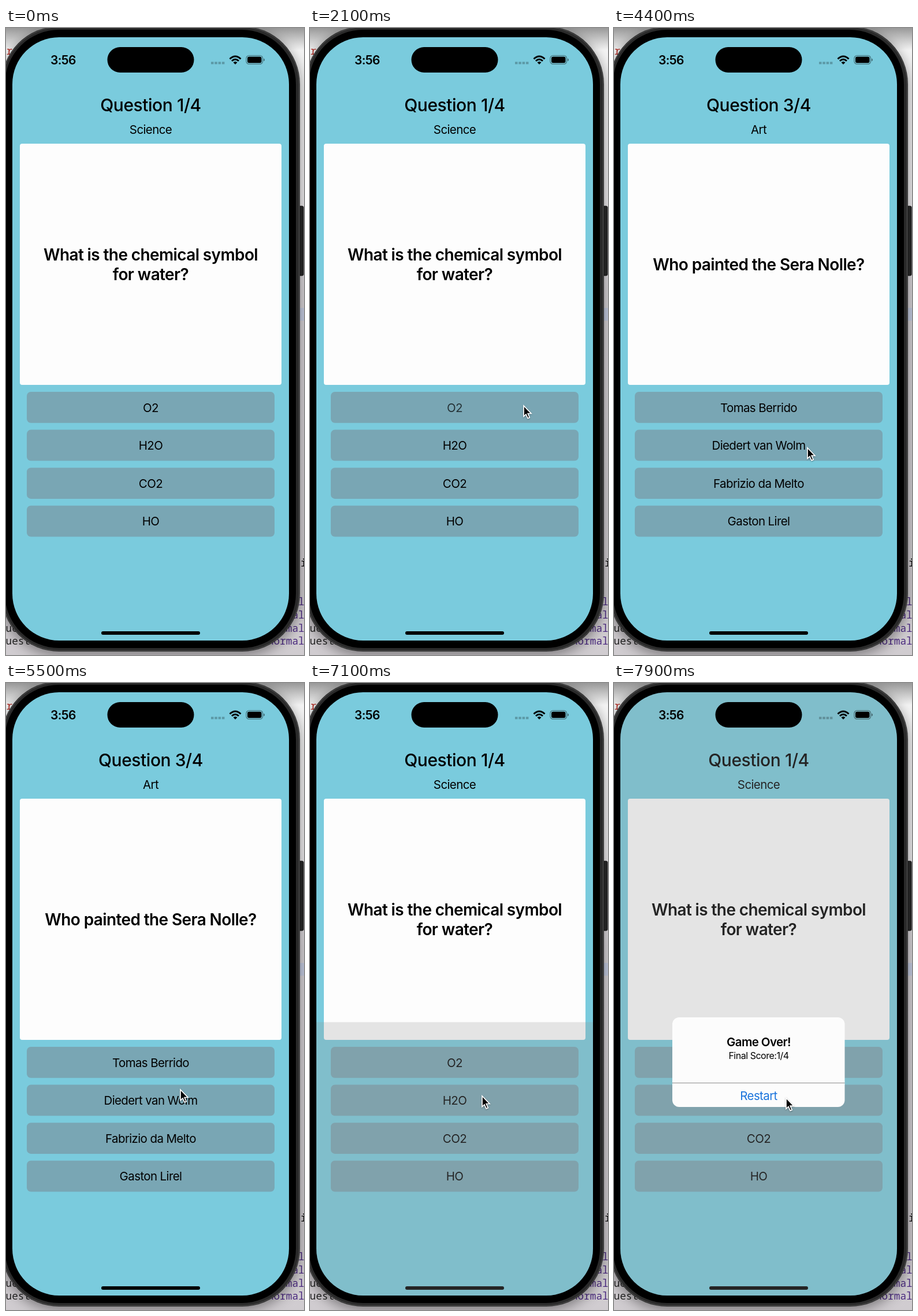
Animation, 516 px wide and 1084 px high, one loop 8000 ms. Source, as an HTML page:

```html
<!DOCTYPE html>
<html lang="en">
<head>
<meta charset="utf-8">
<title>Quiz</title>
<style>
  html, body { margin: 0; width: 100%; height: 100%; overflow: hidden; }
  svg { display: block; width: 516px; height: 1084px; }
  text { font: 20.5px Inter, Roboto, sans-serif; font-optical-sizing: none; letter-spacing: -.03em; text-anchor: middle; }
  #title { font-size: 30px; font-weight: 500; letter-spacing: -.015em; }
  #card text { font-size: 28px; font-weight: 600; letter-spacing: -.022em; }
  .bold { font-weight: 600; }
  .code text { font: 500 17.7px "Noto Sans Mono", "DejaVu Sans Mono", monospace; letter-spacing: 0; text-anchor: start; }
</style>
</head>
<body>
<svg viewBox="0 0 516 1084">
  <defs>
    <linearGradient id="desk" x2="0" y2="1">
      <stop offset="0" stop-color="#999"/>
      <stop offset=".035" stop-color="#f4f4f4"/>
      <stop offset=".27" stop-color="#efedef"/>
      <stop offset=".42" stop-color="#d8d4d8"/>
      <stop offset="1" stop-color="#d0ccd0"/>
    </linearGradient>
    <clipPath id="glass"><rect x="11" y="16" width="479" height="1043" rx="81"/></clipPath>
  </defs>

  <rect width="516" height="1084" fill="url(#desk)"/>
  <rect x="505" y="484" width="11" height="22" fill="#c6cde2"/>
  <g class="code">
    <text x="-10" y="46" fill="#b3261e">er</text>
    <text x="510" y="931">i</text>
    <g id="code"></g>
  </g>

  <rect x="507" y="308" width="8" height="120" rx="2" fill="#2a2a2a" stroke="#0c0c0c"/>
  <rect x="-8" y="-3" width="517" height="1081" rx="100" fill="#2a2a2a" style="filter: drop-shadow(0 6px 11px rgba(0,0,0,.42))"/>
  <rect x="-6.5" y="-1.5" width="514" height="1078" rx="98.5" fill="none" stroke="#505050"/>
  <rect x="-2" y="3" width="504" height="1069" rx="94"/>

  <g clip-path="url(#glass)">
    <rect x="11" y="16" width="479" height="1043" fill="#7acbdd"/>
    <text id="title" x="250.5" y="144"></text>
    <text id="topic" x="250.5" y="183"></text>
    <rect x="24" y="200" width="453" height="417" rx="4" fill="#fdfdfd"/>
    <g id="card"></g>
    <g id="answers"></g>
    <rect x="165" y="1043" width="171" height="6" rx="3"/>
    <g id="sheet">
      <rect x="11" y="16" width="479" height="1043" fill="#949494" fill-opacity=".243"/>
      <rect x="101" y="578" width="298.5" height="155" rx="12" fill="#fcfcfc"/>
      <text class="bold" x="250.5" y="628">Game Over!</text>
      <text x="250.5" y="650" style="font-size:16px">Final Score:1/4</text>
      <path d="M101 691.5H399.5" stroke="#8c8c8c"/>
      <text x="250.5" y="720.5" fill="#1a74dc">Restart</text>
    </g>
  </g>

  <rect x="175.5" y="33" width="150" height="44" rx="22"/>
  <text class="bold" x="99" y="62.5" style="font-size:21px">3:56</text>
  <path d="M355 60.5h23.5" stroke="#000" stroke-opacity=".25" stroke-width="4" stroke-dasharray="4.5 1.8"/>
  <path d="M387.5 53.5Q397 44.5 406.5 53.5M391 57Q397 51.5 403 57" fill="none" stroke="#000" stroke-width="3"/>
  <path d="M393.5 59.5Q397 56.5 400.5 59.5L397 63Z"/>
  <rect x="416" y="47.5" width="28.5" height="15" rx="5" fill="none" stroke="#000" stroke-opacity=".45" stroke-width="1.2"/>
  <rect x="418" y="49.5" width="24.5" height="11" rx="3.2"/>
  <path d="M446 52.5q2 .5 2 2.5t-2 2.5z" fill-opacity=".45"/>

  <path id="cursor" d="M1 1V19.5L5 15.8L8.2 22.8L11.2 21.5L8.2 14.5H14Z" stroke="#fff" stroke-width="1.7" style="filter: drop-shadow(0 1px 1px rgba(0,0,0,.35))"/>
</svg>

<script>
const LOOP = 8000, STEP = 100, SHEET_START = 7016;
const $ = id => document.getElementById(id);

const quiz = [
  ["Science", ["What is the chemical symbol", "for water?"], ["O2", "H2O", "CO2", "HO"]],
  ["Geography", ["Which continent is the Sahara", "Desert located on?"], ["Asia", "Africa", "Australia", "South America"]],
  ["Art", ["Who painted the Sera Nolle?"], ["Tomas Berrido", "Diedert van Wolm", "Fabrizio da Melto", "Gaston Lirel"]],
  ["Math", ["What is the square root", "of 64?"], ["6", "7", "8", "9"]]
];

// When each question appears, and when an answer row is held down.
const shown = [[0, 0], [2200, 1], [3900, 2], [5800, 3], [7000, 0]];
const presses = [[2000, 2200, 0], [3800, 3900, 1], [5700, 5800, 1], [6900, 7000, 1]];

// Pointer stops: time, x, y
const path = [
  [1000, 530, 700], [1700, 369, 652], [2300, 369, 652], [3100, 340, 729],
  [4200, 340, 729], [5000, 301, 702], [5900, 301, 702], [6500, 297, 713],
  [7400, 297, 713], [7800, 297, 716.5], [LOOP, 297, 716.5]
];

const label = (text, y, opacity = 1) => `<text x="250.5" y="${y}" fill-opacity="${opacity}">${text}</text>`;

function pointerAt(t) {
  const i = path.findIndex(p => p[0] > t);
  if (i < 1) return null;
  const [t0, x0, y0] = path[i - 1], [t1, x1, y1] = path[i];
  const u = (t - t0) / (t1 - t0), k = u * u * (3 - 2 * u);
  return [x0 + (x1 - x0) * k, y0 + (y1 - y0) * k];
}

function showQuestion(t) {
  const n = shown.findLast(s => s[0] <= t)[1];
  const [topic, lines, answers] = quiz[n];
  const held = presses.find(p => t >= p[0] && t < p[1])?.[2];
  $("title").textContent = `Question ${n + 1}/4`;
  $("topic").textContent = topic;
  $("card").innerHTML = lines.map((line, i) => label(line, 419 + 34 * (i - (lines.length - 1) / 2))).join("");
  $("answers").innerHTML = answers.map((answer, i) => {
    const y = 629 + 65.6 * i;
    return `<rect x="36" y="${y}" width="429" height="53.7" rx="7" fill="#79a6b4"/>` +
      label(answer, y + 34.5, i === held ? .7 : 1);
  }).join("");
}

function draw(t) {
  showQuestion(t);

  // Critically damped rise of the game-over sheet
  const u = Math.max(0, t - SHEET_START) * .01825;
  $("sheet").setAttribute("transform", `translate(0 ${1043 * (1 + u) * Math.exp(-u)})`);

  const p = pointerAt(t);
  $("cursor").style.display = p ? "" : "none";
  if (p) $("cursor").setAttribute("transform", `translate(${p})`);
}

$("code").innerHTML = [998, 1021, 1044, 1066].map((y, i) =>
  `<text x="453" y="${y}" fill="#4b2a80">normal</text>` +
  (i > 1 ? `<text x="-11" y="${y}" fill="#222">question</text>` : "")).join("");

const start = performance.now();
let last = -1;
function tick() {
  const t = Math.floor((performance.now() - start) % LOOP / STEP) * STEP;
  if (t !== last) draw(last = t);
  requestAnimationFrame(tick);
}
tick();
</script>
</body>
</html>
```
